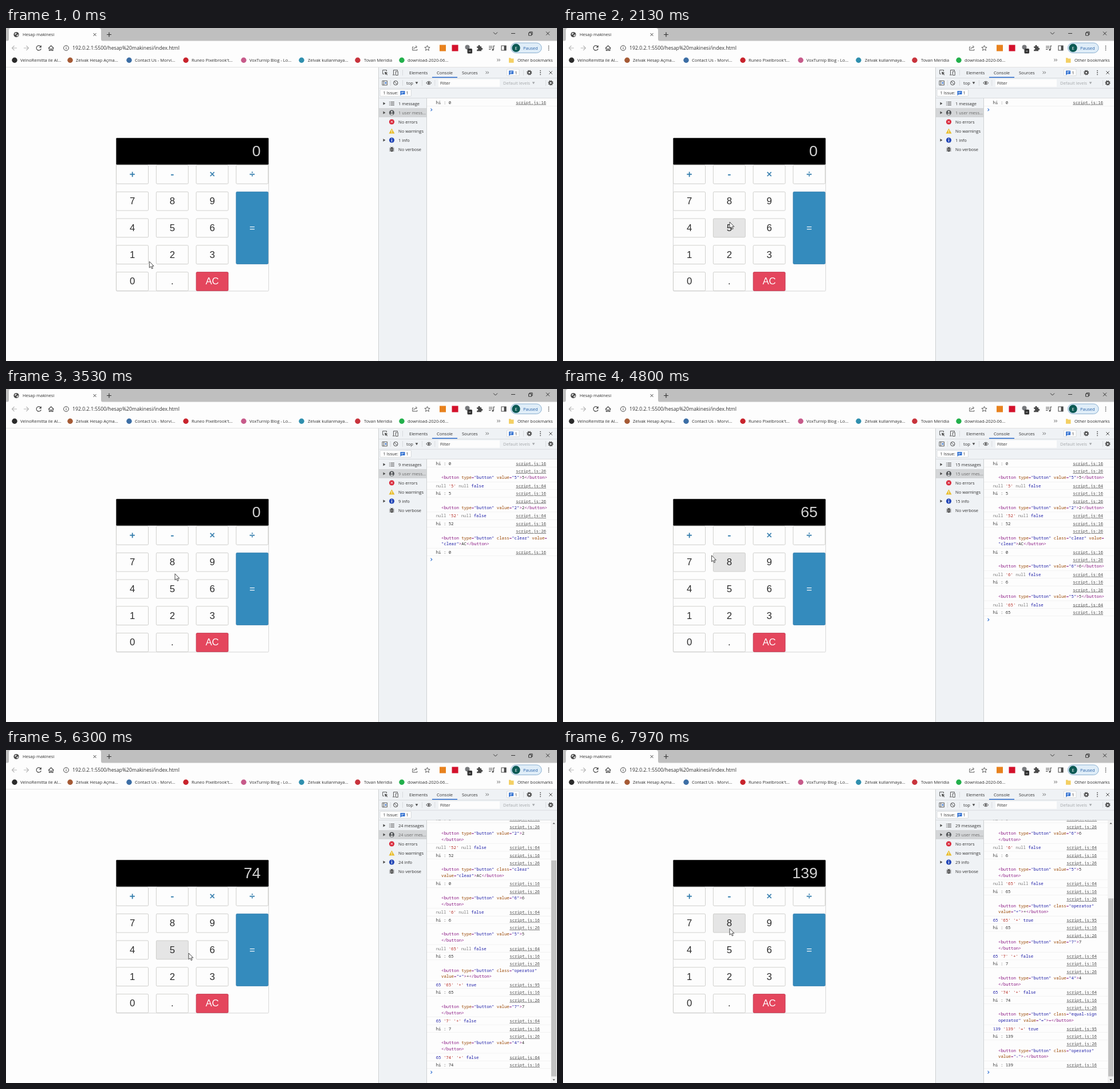
Recreate the animation shown at these times as an HTML page. Size 962 px wide and 582 px high, loop 8000 ms.

```html
<!DOCTYPE html>
<html lang="tr">
<head>
<meta charset="utf-8">
<title>Hesap makinesi</title>
<style>
html, body { margin: 0; width: 100%; height: 100%; overflow: hidden; background: #fdfdfd; }
svg { display: block; width: 100vw; height: 100vh; }
text { font-family: "Open Sans", "Noto Sans", sans-serif; font-size: 7.5px; fill: #303030; white-space: pre; }
.mono { font-family: "Noto Sans Mono", "DejaVu Sans Mono", monospace; font-size: 7.33px; }
.link { fill: #4c4c4c; text-decoration: underline; text-anchor: end; }
.key { font-family: "Liberation Sans", Arial, sans-serif; font-size: 16.7px; text-anchor: middle; }
.op { stroke: #337cac; stroke-width: .5px; }
.screen { font-family: "Liberation Sans", Arial, sans-serif; font-size: 26.7px; text-anchor: end; fill: #d2d2d2; }
</style>
</head>
<body>
<svg id="stage" viewBox="0 0 962 582" xmlns="http://www.w3.org/2000/svg"></svg>
<script>
const LOOP = 8000, DARK = '#4a4a4a', PALE = '#fdfdfd', PANEL = '#eff2f5', BLUE = '#2f6fd0';

const esc = s => s.replace(/&/g, '&amp;').replace(/</g, '&lt;').replace(/>/g, '&gt;');
const rect = (x, y, w, h, fill, more = '') => `<rect x="${x}" y="${y}" width="${w}" height="${h}" fill="${fill}" ${more}/>`;
const disc = (x, y, r, fill, more = '') => `<circle cx="${x}" cy="${y}" r="${r}" fill="${fill}" ${more}/>`;
const line = (d, stroke = DARK, w = 1, fill = 'none') => `<path d="${d}" stroke="${stroke}" stroke-width="${w}" fill="${fill}"/>`;
const shape = (d, fill = DARK) => `<path d="${d}" fill="${fill}"/>`;
// y is the visual middle of the text
const text = (x, y, s, more = '', size = 7.5) => `<text x="${x}" y="${y + size * .36}" ${more}>${esc(s)}</text>`;
const cross = (x, y, r, c = DARK, w = 1) => line(`M${x - r} ${y - r}l${2 * r} ${2 * r}m0 ${-2 * r}l${-2 * r} ${2 * r}`, c, w);
const dots = (x, y) => [-3.3, 0, 3.3].map(d => disc(x, y + d, .9, DARK)).join('');
const gear = (x, y) => disc(x, y, 2.5, 'none', `stroke="${DARK}" stroke-width="1.8"`) +
  disc(x, y, 3.9, 'none', `stroke="${DARK}" stroke-width="1.3" stroke-dasharray="1.6 1.46"`);
const bar = (x, y) => rect(x, y - 5, .7, 10, '#cfd2d5');
const chat = (x, y) => shape(`M${x - 4} ${y - 3.5}h8v6h-5.5l-2.5 2z`, BLUE) + rect(x - 2.3, y - 1.8, 4.6, .8, '#fff') + rect(x - 2.3, y, 3, .8, '#fff');
const down = (x, y, c = DARK) => shape(`M${x - 2.3} ${y - 1.8}h4.6l-2.3 4z`, c);

function browser() {
  const marks = [
    [15, '#2b2b2b', 25, 'VelnoRemitta ile Al...'], [112, '#a55a35', 122, 'Zelvak Hesap Açma...'],
    [215, '#3c6ea5', 225, 'Contact Us - Morvi...'], [314, '#c8232c', 324, "Runeo Pixelbrook't..."],
    [415, '#c75a8a', 425, 'VoxTurnip Blog - Lo...'], [516, '#2f8fae', 527, 'Zelvak kullanmaya...'],
    [614, '#c8333c', 625, 'Tovan Meridia'], [691, '#22b04b', 701, 'download-2020-06...']];
  return rect(0, 0, 962, 23, '#bfbfbf') + rect(0, 22.5, 962, 46, PALE) + rect(0, 68, 962, .8, '#dcdcdc') +
    shape('M2 23q3 0 3-4V4q0-4 4-4h153q4 0 4 4v15q0 4 3 4z', PALE) +
    disc(18, 11.5, 4.6, DARK) + shape('M14.6 10.5l3-2.5 1 1.5-2 2.4zM18 13l3-2 .8 1.5-2.3 2.6z', '#dedede') +
    text(29, 11.5, 'Hesap makinesi') + cross(155, 11.5, 2.5) +
    line('M176 11.5h8m-4-4v8', '#333', 1.2) +
    line('M851 7.5l3.5 3.5 3.5-3.5M882 9.5h7M912.5 8.5h5v4.5h-5zM914 8.5v-1.7h5v4.8h-1.5', '#333') + cross(946, 9.5, 3, '#333') +
    line('M19 35h-8.5m4-4l-4 4 4 4M31 35h8.5m-4-4l4 4-4 4', '#b5b5b5', 1.1) +
    line('M60.5 32.2a4.2 4.2 0 1 0 .8 4', DARK, 1.2) + shape('M61.8 30v4.2h-4.2z') +
    line('M74 35.5l4.7-4.7 4.7 4.7M75.5 34.5v5h2.2v-3h2v3h2.2v-5', DARK, 1.2) +
    disc(105, 35, 4.4, 'none', `stroke="${DARK}"`) + rect(104.5, 34.2, 1, 3, DARK) + rect(104.5, 32.3, 1, 1.1, DARK) +
    text(116, 35, '192.0.2.1:5500/hesap%20makinesi/index.html', 'style="font-size:8.72px"', 8.7) +
    line('M711.5 33h-1.7v6h8v-2M712 37q.5-4 5-4m-1.8-2.3l2.4 2.3-2.4 2.3', DARK, .9) +
    line('M735.5 30.5l1.3 3 3.3.3-2.5 2.2.8 3.3-2.9-1.8-2.9 1.8.8-3.3-2.5-2.2 3.3-.3z', DARK, .9) +
    rect(757, 29.5, 11, 11, '#e8821e') + rect(778.5, 29.5, 11, 11, '#d3112b') +
    disc(805.5, 33.5, 4, '#77797c') + rect(805.5, 36, 8.5, 8.5, '#333', 'rx="1.5"') + rect(808, 40, 3.5, .8, '#ddd') +
    shape('M822 32.2h2.5a1.7 1.7 0 1 1 3 0h2.6v2.7a1.6 1.6 0 1 1 0 3v2.3h-8v-2.5a1.6 1.6 0 1 0 0-3z') +
    line('M843 32h6.5M843 34.7h6.5M843 37.5h3.5M851.3 37.5v-6.2h2', DARK, 1.1) + disc(850, 38, 1.6, DARK) +
    line('M865 31h8v8h-8z', DARK, 1.1) + rect(869.5, 31, 3.7, 8, DARK) +
    rect(881.5, 26, 53.5, 17.5, '#dfedf8', 'rx="8.7" stroke="#6f9cc4" stroke-width=".8"') +
    disc(890.5, 34.8, 7.2, '#0d5a55') + text(890.5, 34.8, 'E', 'text-anchor="middle" style="fill:#fff"') +
    text(903, 34.8, 'Paused', 'style="fill:#2a62a8"') + dots(947.5, 35) +
    marks.map(([ix, c, x, s]) => disc(ix, 56.3, 4.7, c) + text(x, 56.3, s)).join('') +
    line('M857.5 53.8l2 2.2-2 2.2m3-4.4l2 2.2-2 2.2', DARK, .9) +
    shape('M878 52.3h3l1 1.2h4.5v7.3H878z', '#f3cf63') + text(893, 56.3, 'Other bookmarks');
}

function devtools() {
  const rows = [132, 148, 164, 180, 196, 212];
  return rect(650, 69, 312, 53.5, PANEL) + rect(650, 69, 85, 513, PANEL) + rect(735, 122.5, 227, 459.5, PALE) +
    rect(650, 69, .8, 513, '#c6c8ca') + rect(734, 122.5, .8, 459.5, '#c6c8ca') +
    [87, 104.8, 122].map(y => rect(650, y, 312, .7, '#cfd2d5')).join('') +
    line('M664.5 76v-2.5h-6.8v6.8h2.5', DARK, .9) + shape('M661 76.3l5.5 2.2-2.3 1 2 2.2-.9.8-2-2.2-1 2z') +
    line('M676.5 81.5v-8h7v1.5M680.3 76h4v6.5h-4zM675 82h4', DARK, .9) + bar(692, 78) +
    text(704, 78, 'Elements') + text(752, 78, 'Console') + text(796, 78, 'Sources') +
    rect(744, 85.5, 44, 1.5, BLUE) + line('M837.5 75.7l2.2 2.2-2.2 2.2m3-4.4l2.2 2.2-2.2 2.2', DARK, .8) +
    rect(874.5, 72, 21.5, 11.5, PALE, 'rx="1" stroke="#cdd0d3" stroke-width=".7"') + chat(882, 78) + text(888.5, 78, '1') +
    bar(903, 78) + gear(913.7, 78) + dots(933, 78) + cross(951, 78, 2.7) +
    line('M657 92.3h8.5v7.5H657zM659.7 92.3v7.5', DARK, .9) + shape('M664 94l-3 2 3 2z', BLUE) + bar(671, 96) +
    disc(680.3, 96, 3.7, 'none', `stroke="${DARK}"`) + line('M677.7 93.4l5.2 5.2') + bar(692, 96) +
    text(699, 96.3, 'top') + down(717, 96) + bar(726, 96) +
    line('M733.7 96q4.5-5.5 9 0q-4.5 5.5-9 0z') + disc(738.2, 96, 1.7, DARK) + bar(748.5, 96) +
    rect(755, 89.8, 107, 13, PALE) + text(758, 96.5, 'Filter') +
    text(868, 96.3, 'Default levels', 'style="fill:#a5a8ab"') + down(921, 96, '#a5a8ab') + bar(942, 96) + gear(951, 96) +
    rect(653, 107.3, 54.5, 12, PALE, 'rx="1" stroke="#cdd0d3" stroke-width=".7"') +
    text(658.5, 113.5, '1 Issue:') + chat(692.5, 113.5) + text(698.5, 113.5, '1') +
    rect(651, 140, 83, 16, '#d4d6d8') +
    [132, 148, 196].map(y => shape(`M658.5 ${y - 2.6}l4 2.6-4 2.6z`)).join('') +
    [-2.7, 0, 2.7].map(d => rect(669, 131.5 + d, 1.2, 1, DARK) + rect(671.3, 131.5 + d, 6.7, 1, DARK)).join('') +
    disc(673.5, 148, 4.6, '#55585b') + disc(673.5, 146.6, 1.5, '#e3e3e3') + shape('M670.7 150.8q2.8-3 5.6 0q-2.8 2-5.6 0z', '#e3e3e3') +
    disc(673.5, 164, 4.6, '#d8283a') + cross(673.5, 164, 1.8, '#fff') +
    shape('M673.5 175.5l5 9h-10z', '#e9bd2c') + rect(673, 178.5, 1, 3, '#fff') + rect(673, 182.3, 1, 1, '#fff') +
    disc(673.5, 196, 4.6, '#2448b8') + rect(672.9, 195.3, 1.2, 3.3, '#fff') + rect(672.9, 193, 1.2, 1.3, '#fff') +
    rect(671.3, 208.3, 4.6, 8, DARK, 'rx="2.2"') + line('M669.3 210.2h8.4m-8.4 2.3h8.4m-8.4 2.3h8.4M671.5 207.5l1 1m3-1l-1 1', DARK, .9) +
    rect(672.5, 211, 2.2, .7, '#eee') + rect(672.5, 213.2, 2.2, .7, '#eee') +
    rows.map((y, i) => text(685, y + .3, ['', '', 'No errors', 'No warnings', '', 'No verbose'][i],
      `class="side" ${i === 1 ? 'style="fill:#6b6b6b"' : ''}`)).join('');
}

const keys = [];
['+-×÷', '789=', '456', '123', '0.A'].forEach((row, r) => [...row].forEach((k, c) => {
  const key = { k: k === 'A' ? 'AC' : k, x: 192.6 + c * 69.75, y: 239.6 + r * 46.75, w: 55.9, h: k === '=' ? 126.1 : 32.7 };
  [key.fill, key.over, key.edge, key.ink] =
    k === 'A' ? ['#e4465d', '#ec6c7e', '#b9304a', '#fff'] :
    k === '=' ? ['#348bbd', '#4e9ed4', '#337cac', '#fff'] :
    [PALE, '#e5e5e5', '#c4c4c0', r ? '#2b2b2b' : '#337cac'];
  key.type = r ? 'key' : 'key op';
  keys.push(key);
}));

function calculator() {
  return rect(192.4, 192.4, 266.2, 267.4, 'none', 'rx="1.5" stroke="#cccccc" stroke-width=".8"') +
    keys.map(b => rect(b.x, b.y, b.w, b.h, b.fill, `class="button" rx="1.6" stroke="${b.edge}" stroke-width=".8"`) +
      text(b.x + b.w / 2, b.y + b.h / 2 - .5, b.k, `class="${b.type}" style="fill:${b.ink}"`, 16.7)).join('') +
    rect(192.4, 192.2, 266, 46.6, '#000', 'rx="1"') + '<text id="screen" class="screen" x="444.7" y="223.8"></text>';
}

// time, key, screen, logged line
const clicks = [
  [2250, '5', '5', "null '5' null false"], [2650, '2', '52', "null '52' null false"],
  [3060, 'AC', '0', ''], [3920, '6', '6', "null '6' null false"],
  [4360, '5', '65', "null '65' null false"], [5060, '+', '65', "65 '65' '+' true"],
  [5560, '7', '7', "65 '7' '+' false"], [5930, '4', '74', "65 '74' '+' false"],
  [6690, '=', '139', "139 '139' '=' true"], [7450, '-', '139', '']];

function markup(k) {
  const cls = k === 'AC' ? 'clear' : k === '=' ? 'equal-sign operator' : '+-'.includes(k) ? 'operator' : '';
  return `<button type="button" ${cls && `class="${cls}" `}value="${k === 'AC' ? 'clear' : k}">${k}</button>`;
}

function wrap(s, max) {
  const lines = [''];
  for (const part of s.split(/(?<= )|(?<=value=)|(?=<\/)/)) {
    const last = lines.length - 1;
    if ((lines[last] + part).trim().length > max) lines.push(part);
    else lines[last] += part;
  }
  return lines.join('\n');
}

const span = (s, c) => `<tspan fill="${c}">${esc(s)}</tspan>`;
const tagColour = t => t[0] === '"' ? '#1a1aa6' : /^(type|class|value)$/.test(t) ? '#994500' : /[<>=]/.test(t) ? '#881280' : '#303030';
const logColour = t => t === 'null' ? '#808080' : t[0] === "'" ? '#b3261e' : '#1a1aa6';
const mono = (x, y, inner, cls = '') => `<text class="mono ${cls}" x="${x}" y="${y + 2.6}">${inner}</text>`;

function tagLines(s) {
  const lines = [''];
  for (const t of s.match(/"[^"]*"|\b(?:type|class|value)\b|<\/?button|[^]/g))
    t.split('\n').forEach((bit, i) => {
      if (i) lines.push('');
      if (bit) lines[lines.length - 1] += span(bit, tagColour(t));
    });
  return lines;
}

function layout(n, narrow) {
  const rows = [];
  let h = 0;
  const add = (size, link, lines, kind) => { rows.push({ y: h, size, link, lines, kind }); h += size; };
  const hi = v => add(13.4, 16, [esc('hi : ' + v)], 'plain');
  hi('0');
  for (const [, k, shown, log] of clicks.slice(0, n)) {
    const lines = tagLines(wrap(markup(k), narrow ? 40 : 42));
    add(15.1 + 10.7 * lines.length, 26, lines, 'tag');
    if (log) add(13.4, log.endsWith('true') ? 95 : 64, [log.split(' ').map(t => span(t, logColour(t))).join(' ')], 'plain');
    hi(shown);
  }
  return { rows, h, total: h + 25 };
}

function consoleView(n) {
  const view = 460;
  let page = layout(n, false);
  const scroll = page.total > view;
  if (scroll) page = layout(n, true);
  const top = scroll ? 582 - page.total : 123.3;
  let out = '';
  for (const r of page.rows) {
    const y = top + r.y, mid = y + 6.7;
    if (y + r.size < 116) continue;
    out += rect(735, y + r.size - .5, 227, .6, '#ececec') + mono(scroll ? 932 : 943, mid, 'script.js:' + r.link, 'link');
    r.lines.forEach((l, i) => out += r.kind === 'tag' ? mono(760, mid + 11.3 + i * 10.7, l) : mono(750.7, mid, l));
  }
  const p = top + page.h + 6.2;
  out += line(`M741.5 ${p - 2.3}l2.3 2.3-2.3 2.3`, BLUE, 1.1);
  if (scroll) {
    const thumb = 436 * view / page.total;
    out += rect(951, 122.5, 11, 460, '#f1f1f1') + rect(952, 570.5 - thumb, 9, thumb, '#c1c1c1') +
      shape('M954.3 129.3l2.2-2.3 2.2 2.3z', '#555') + shape('M954.3 575.5l2.2 2.3 2.2-2.3z', '#555');
  }
  return { out, count: page.rows.length };
}

const stage = document.getElementById('stage');
stage.innerHTML = '<clipPath id="pane"><rect x="735" y="122.5" width="227" height="460"/></clipPath>' +
  rect(0, 0, 962, 582, PALE) + browser() + devtools() + calculator() +
  '<g id="log" clip-path="url(#pane)"></g><g id="pointer">' +
  line('M0 0V11L2.6 8.8 4.3 12.7 6.1 11.9 4.4 8.1H7.8Z', '#333', .9, '#fff') + '</g>';
const $ = id => document.getElementById(id);
const buttons = stage.querySelectorAll('.button'), side = stage.querySelectorAll('.side');

// pointer stops: time, x, y
const path = [
  [0, 250.3, 408], [1300, 250.3, 408], [1800, 286, 352], [2130, 291, 339], [2300, 291, 339],
  [2560, 289, 392], [2720, 289, 392], [2980, 358, 440], [3160, 358, 440], [3530, 295, 323],
  [3820, 357, 345], [4000, 357, 345], [4270, 300, 345], [4500, 300, 345], [4800, 259.7, 291],
  [5000, 222, 258], [5140, 222, 258], [5470, 224, 303], [5630, 224, 303], [5860, 224, 350],
  [6020, 224, 350], [6300, 318.6, 355], [6600, 428, 352], [6800, 428, 352], [7200, 298, 257],
  [7620, 298, 257], [7970, 291, 312], [8000, 291, 316]];

function slope(i, a) {
  const p = path[i - 1], c = path[i], q = path[i + 1];
  const rests = o => o && o[1] === c[1] && o[2] === c[2];
  if (!p || !q || rests(p) || rests(q)) return 0;
  return (q[a] - p[a]) / (q[0] - p[0]);
}

function pointerAt(t) {
  let i = 0;
  while (i < path.length - 2 && t >= path[i + 1][0]) i++;
  const p = path[i], q = path[i + 1], h = q[0] - p[0], u = Math.max(0, t - p[0]) / h, v = 1 - u;
  return [1, 2].map(a => p[a] * (1 + 2 * u) * v * v + slope(i, a) * h * u * v * v +
    q[a] * u * u * (3 - 2 * u) - slope(i + 1, a) * h * u * u * v);
}

let shownClicks = -1;
function draw(t) {
  const n = clicks.filter(c => c[0] <= t).length;
  if (n !== shownClicks) {
    shownClicks = n;
    const { out, count } = consoleView(n);
    $('log').innerHTML = out;
    $('screen').textContent = n ? clicks[n - 1][2] : '0';
    side[0].textContent = count + (count > 1 ? ' messages' : ' message');
    side[1].textContent = count + (count > 9 ? ' user mes...' : ' user mess...');
    side[4].textContent = count + ' info';
  }
  // hover trails the pointer by one refresh
  const [x, y] = pointerAt(t), [hx, hy] = pointerAt(Math.max(0, t - 33));
  $('pointer').setAttribute('transform', `translate(${x.toFixed(2)} ${y.toFixed(2)})`);
  keys.forEach((b, i) => {
    const over = hx >= b.x && hx <= b.x + b.w && hy >= b.y && hy <= b.y + b.h;
    buttons[i].setAttribute('fill', over ? b.over : b.fill);
  });
}

const start = performance.now();
function tick() {
  draw((performance.now() - start) % LOOP);
  requestAnimationFrame(tick);
}
tick();
</script>
</body>
</html>
```
